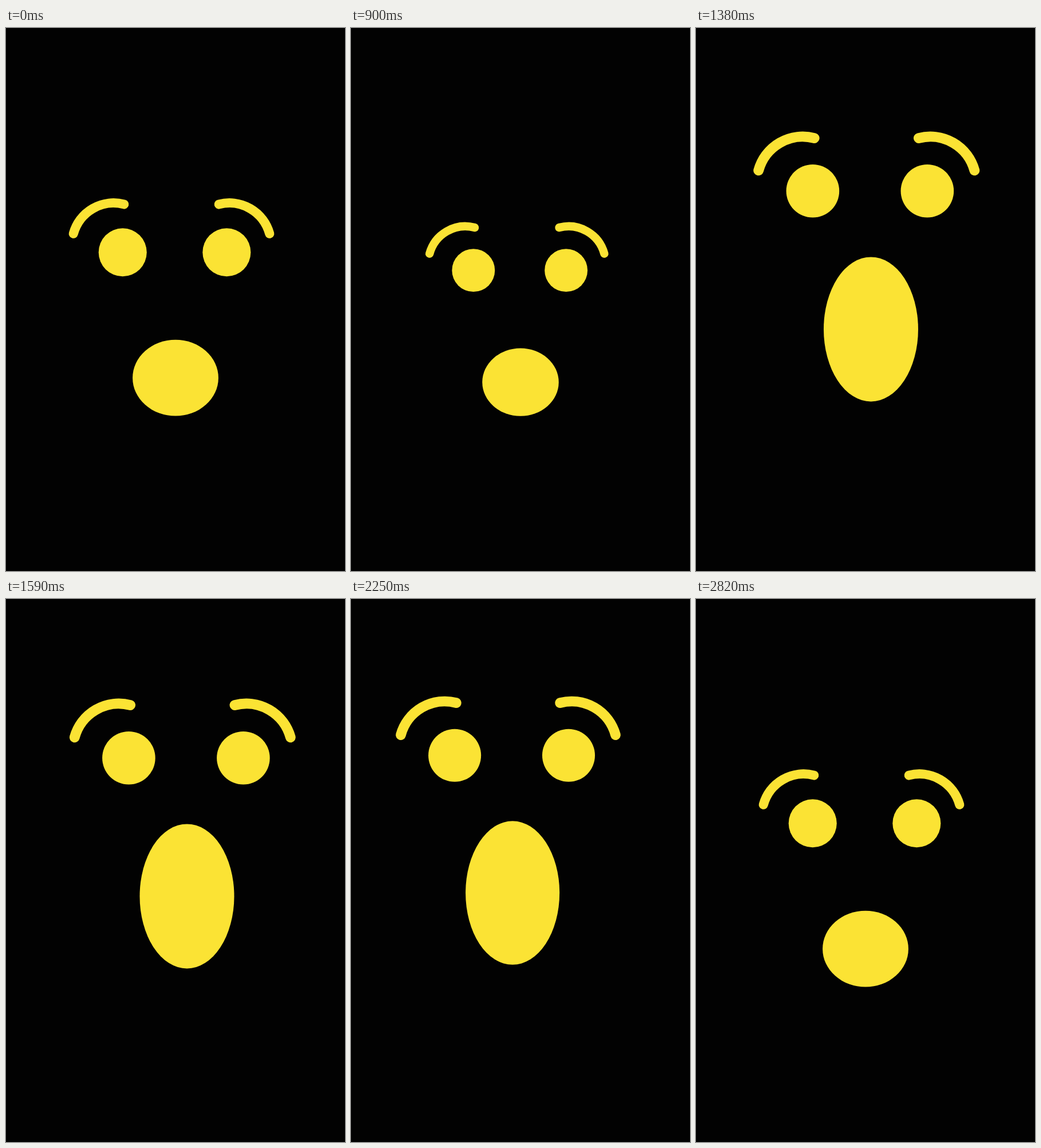
An HTML page for the animation above (3000 ms loop, 592 by 947 pixels).

```html
<!DOCTYPE html>
<html lang="en">
<head>
<meta charset="utf-8">
<title>Surprised face</title>
<style>
  html, body { margin: 0; height: 100%; overflow: hidden; background: #020202; }
  svg { display: block; width: 100%; height: 100%; }
</style>
</head>
<body>
<svg viewBox="0 0 592 947">
  <g id="face" fill="#fbe334">
    <g fill="none" stroke="#fbe334" stroke-width="17.8" stroke-linecap="round">
      <path d="M-196.3 -199.7A80 80 0 0 1 -98.8 -256"/>
      <path d="M180.9 -199.7A80 80 0 0 0 83.4 -256"/>
    </g>
    <circle cx="-101.6" cy="-163.8" r="46.3"/>
    <circle cx="98.4" cy="-163.8" r="46.3"/>
    <ellipse id="mouth" cy="77.3" rx="82.5"/>
  </g>
</svg>
<script>
const LOOP = 3000, STEP = 30;
const face = document.getElementById('face');
const mouth = document.getElementById('mouth');

// Progress from 0 to 1 between two times, constant or eased
const ramp = (t, from, to) => Math.min(1, Math.max(0, (t - from) / (to - from)));
const ease = (t, from, to) => (1 - Math.cos(Math.PI * ramp(t, from, to))) / 2;

function draw(now) {
  const t = Math.floor(now % LOOP / STEP) * STEP;

  const dip = ease(t, 460, 840);
  const rise = ease(t, 840, 1240);
  const right = ease(t, 1235, 1535);
  const drift = ease(t, 1535, 1770);
  const left = ease(t, 1770, 1920);
  const back = ease(t, 2220, 2703);
  const x = 296 + 20 * right - 34 * left + 14 * back;
  const y = 540 + 21 * dip - 107 * rise - 12.5 * right - 3.2 * drift - 3.6 * left + 105.3 * back;

  const shrink = ramp(t, 450, 900);
  const grow = ramp(t, 900, 1150);
  const settle = ramp(t, 2220, 2706);
  const scale = .908 - .099 * shrink + .191 * grow - .092 * settle;

  const open = ramp(t, 900, 1200) - ramp(t, 2460, 2820);

  face.setAttribute('transform', `translate(${x} ${y}) scale(${scale})`);
  mouth.setAttribute('ry', 73.1 + 52.9 * open);
}

const start = performance.now();
function tick() {
  draw(performance.now() - start);
  requestAnimationFrame(tick);
}
tick();
</script>
</body>
</html>
```
